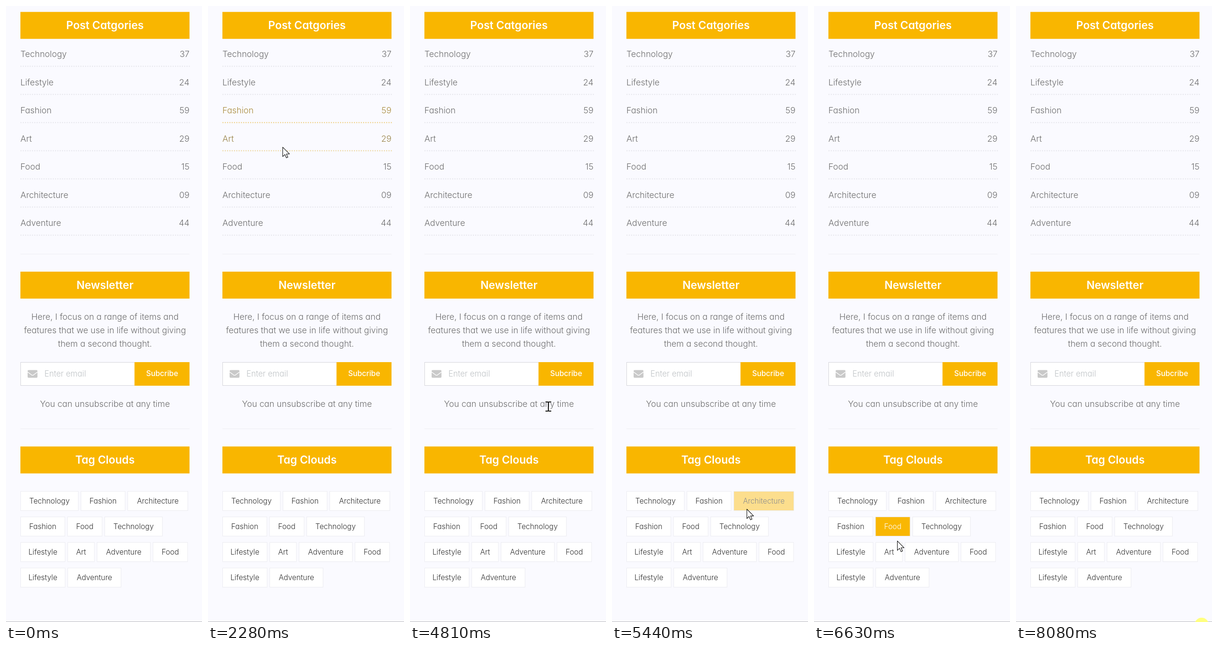
An HTML page that plays this animation: 408 by 1280 pixels, repeating every 8210 ms.

```html
<!DOCTYPE html>
<html lang="en">
<head>
<meta charset="utf-8">
<title>Blog sidebar</title>
<style>
  html, body { margin: 0; width: 100%; height: 100%; overflow: hidden; background: #fafaff; }
  svg { display: block; width: 100vw; height: 100vh; }
  text { font-family: Inter, "Open Sans", sans-serif; font-weight: 300; font-size: 17.7px; fill: #6e6e6e; font-feature-settings: "cv11"; }
  .mid { text-anchor: middle; }
  .end { text-anchor: end; }
  .head { font-size: 22.6px; font-weight: 600; fill: #fff; }
  .tag { font-size: 15.4px; }
  .button { font-size: 15.5px; font-weight: 500; fill: #fff; }
  .hint { font-size: 16.6px; fill: #bfc3c6; }
</style>
</head>
<body>
<svg id="stage" viewBox="0 0 408 1280"></svg>
<script>
const LOOP = 8210, FADE = 400;
const LEFT = 30, WIDTH = 352, RIGHT = LEFT + WIDTH, CENTER = LEFT + WIDTH / 2;
const GOLD = [249, 182, 0], WHITE = [255, 255, 255], GREY = [110, 110, 110];
const INK = [51, 51, 51], FAINT = [230, 230, 236];
const stage = document.getElementById('stage');

function add(name, attrs, text, parent = stage) {
  const node = document.createElementNS('http://www.w3.org/2000/svg', name);
  for (const key in attrs) node.setAttribute(key, attrs[key]);
  if (text) node.textContent = text;
  parent.appendChild(node);
  return node;
}
const rect = (x, y, width, height, fill, more) => add('rect', { x, y, width, height, fill, ...more });
const label = (x, y, text, cls = '') => add('text', { x, y, class: cls }, text);
const box = (x, y, w, h) => ({ x, y, w, h });
const inside = (p, b) => p.x >= b.x && p.x <= b.x + b.w && p.y >= b.y && p.y <= b.y + b.h;
const mix = (a, b, k) => `rgb(${a.map((v, i) => Math.round(v + (b[i] - v) * k))})`;
const smooth = v => {
  const u = Math.max(0, Math.min(1, v));
  return u * u * (3 - 2 * u);
};

// Key points of the pointer: time, x, y
const path = [
  [70, 384, 1274], [600, 335, 300], [890, 170, 88], [1250, 164, 105], [1520, 164, 142],
  [2000, 152, 208], [2680, 164, 418], [3050, 174, 456], [3800, 285, 700], [4150, 302, 808],
  [4410, 285, 779], [4550, 285, 779], [4810, 288, 832], [5370, 286, 1045], [5640, 250, 1045],
  [6000, 187, 1041], [6250, 169, 1078], [6590, 168, 1097], [6630, 173, 1111],
  [7050, 185, 1184], [7690, 305, 1284]
];
const last = path.length - 1;
const slope = (i, k) => {
  const a = path[Math.max(0, i - 1)], b = path[Math.min(last, i + 1)];
  return (b[k] - a[k]) / (b[0] - a[0]);
};
function pointer(t) {
  if (t < path[0][0] || t > path[last][0]) return null;
  const i = Math.max(0, path.findIndex(p => t <= p[0]) - 1);
  const a = path[i], b = path[i + 1], d = b[0] - a[0], u = (t - a[0]) / d, s = smooth(u);
  const at = k => a[k] === b[k] ? a[k] : a[k] * (1 - s) + b[k] * s
    + d * u * (1 - u) * ((1 - u) * slope(i, k) - u * slope(i + 1, k));
  return { x: at(1), y: at(2) };
}

// Times during which the pointer is within an area
function spansIn(area) {
  const spans = [];
  let open = null;
  for (let t = 0; t < LOOP; t += 5) {
    const p = pointer(t), hit = p && inside(p, area);
    if (hit && !open) spans.push(open = { on: t, off: t });
    if (hit) open.off = t; else open = null;
  }
  return spans;
}
const level = (spans, t) => spans.reduce((k, { on, off }) => t < on ? k :
  Math.max(k, smooth((Math.min(t, off) - on) / FADE) * (1 - smooth((t - off) / FADE))), 0);

function heading(y, text) {
  rect(LEFT, y, WIDTH, 56, '#f9b600');
  label(CENTER, y + 35.5, text, 'head mid');
}
const rule = y => rect(LEFT, y, WIDTH, 1, '#eeeef2');
const links = [];

// Categories
heading(12.3, 'Post Catgories');
const rows = [
  ['Technology', '37'], ['Lifestyle', '24'], ['Fashion', '59'], ['Art', '29'],
  ['Food', '15'], ['Architecture', '09'], ['Adventure', '44']
].map(([name, count], i) => {
  const y = 68 + i * 58.5;
  links.push(box(LEFT, y + 19, WIDTH, 26));
  return {
    texts: [label(LEFT, y + 38.3, name), label(RIGHT, y + 38.3, count, 'end')],
    dots: add('path', {
      d: `M${LEFT + 1.2} ${y + 57.2}H${RIGHT}`, 'stroke-width': 2.4,
      'stroke-linecap': 'round', 'stroke-dasharray': '0 4.8'
    }),
    spans: spansIn(box(LEFT, y, WIDTH, 58.4))
  };
});
rule(515);

// Newsletter
heading(552, 'Newsletter');
['Here, I focus on a range of items and',
 'features that we use in life without giving',
 'them a second thought.'].forEach((line, i) => label(CENTER, 652 + i * 27.8, line, 'mid'));
rect(30.5, 740.5, 238, 48, '#fff', { stroke: '#d5d5db' });
rect(267.5, 740, 114.5, 49, '#f9b600');
rect(45, 756.5, 20.5, 16, '#c9c9c9', { rx: 2 });
add('path', { d: 'M45 760.5l8.5 6.3q1.8 1.2 3.6 0l8.4-6.3', fill: 'none', stroke: '#fff', 'stroke-width': 1.4 });
label(80, 769.6, 'Enter email', 'hint');
label(325, 769, 'Subcribe', 'button mid');
label(CENTER, 833, 'You can unsubscribe at any time', 'mid');
rule(878);
links.push(box(268, 740, 114, 49));

// Tags flow from left to right and wrap
heading(915.3, 'Tag Clouds');
const tagWidth = {
  Technology: 121, Fashion: 93, Architecture: 126, Food: 73, Lifestyle: 93.5, Art: 56.5, Adventure: 112
};
let nextX = LEFT, tagY = 1008;
const tags = ('Technology Fashion Architecture Fashion Food Technology '
  + 'Lifestyle Art Adventure Food Lifestyle Adventure').split(' ').map(name => {
  const w = tagWidth[name];
  if (nextX + w > RIGHT) { nextX = LEFT; tagY += 53.1; }
  const x = nextX, y = tagY;
  nextX += w + 4.5;
  links.push(box(x, y + 9, w, 22));
  return {
    face: rect(x + .5, y + .5, w - 1, 40, '#fff', { stroke: '#ececf1' }),
    text: label(x + w / 2, y + 25.8, name, 'tag mid'),
    spans: spansIn(box(x, y, w, 41))
  };
});
rect(0, 1279, 408, 1, '#b9b9bd');

// Pointers
const prose = [box(33, 634, 346, 78), box(LEFT, 740, 238, 49), box(66, 815, 280, 26)];
const cursors = { arrow: add('g'), hand: add('g'), beam: add('g') };
const shape = (kind, d, more) => add('path', {
  d, fill: '#fff', stroke: '#111', 'stroke-width': 1.1, 'stroke-linejoin': 'round', ...more
}, '', cursors[kind]);
shape('arrow', 'M.5 .5V20l4.6-4.3 3 7 3.1-1.4-3-6.7h6.3z');
shape('hand', 'M-2 2.5Q-2 .5 0 .5T2 2.5V10Q2 8 4 8T6 10Q6.4 8.8 8 9T10 11Q10.6 10.2 11.6 10.4 13 10.7 13 13V17.5Q13 22 9.5 25H1Q-1.5 24-3.5 20L-7 15.5Q-7.8 12.8-5 13L-2 15.8Z');
shape('hand', 'M2 10v4M6 10v4M10 11v3', { fill: 'none' });
const beam = 'M-6-9.5h4.2Q0-9.5 0-8 0-9.5 1.8-9.5H6M0-8V8M-6 9.5h4.2Q0 9.5 0 8 0 9.5 1.8 9.5H6';
shape('beam', beam, { fill: 'none', stroke: '#fff', 'stroke-width': 3.4 });
shape('beam', beam, { fill: 'none', 'stroke-width': 2 });
const halo = add('circle', { cx: 386.5, cy: 1285.5, r: 14.5, fill: '#ffff80' });

function draw(t) {
  for (const { texts, dots, spans } of rows) {
    const k = level(spans, t);
    texts.forEach(node => node.style.fill = mix(GREY, GOLD, k));
    dots.setAttribute('stroke', mix(FAINT, GOLD, k));
  }
  for (const { face, text, spans } of tags) {
    const k = level(spans, t);
    face.setAttribute('fill', mix(WHITE, GOLD, k));
    text.style.fill = mix(INK, WHITE, k);
  }
  const p = pointer(t), over = list => list.some(b => inside(p, b));
  const kind = !p ? '' : over(links) ? 'hand' : over(prose) ? 'beam' : 'arrow';
  for (const name in cursors) {
    cursors[name].setAttribute('display', name === kind ? 'inline' : 'none');
    if (p) cursors[name].setAttribute('transform', `translate(${p.x.toFixed(2)} ${p.y.toFixed(2)})`);
  }
  halo.setAttribute('opacity', t < 8010 ? 0 : t < 8080 ? .5 : 1);
}

const start = performance.now();
function tick() {
  draw((performance.now() - start) % LOOP);
  requestAnimationFrame(tick);
}
tick();
</script>
</body>
</html>
```
